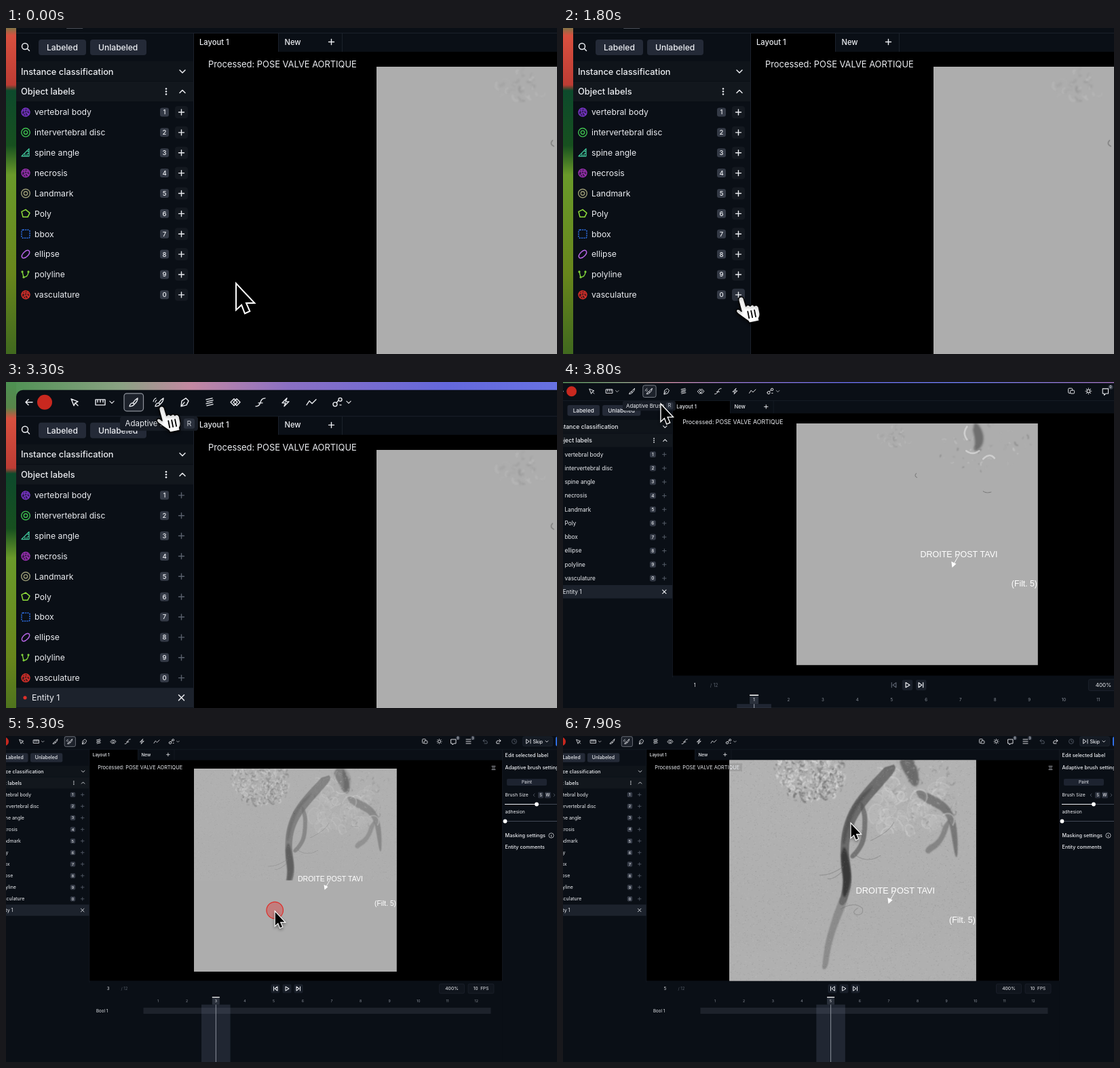
Animation, 812 px wide and 480 px high, one loop 8000 ms. Source, as an HTML page with a canvas:

```html
<!DOCTYPE html>
<html lang="en">
<head>
<meta charset="utf-8">
<style>
html, body { margin: 0; width: 812px; height: 480px; overflow: hidden; background: #0a0e15; }
canvas { display: block; width: 812px; height: 480px; }
</style>
</head>
<body>
<canvas id="stage" width="812" height="480"></canvas>
<script>
const LOOP = 8000, FIT = 0.5707, FIT_X = -34.8, FIT_Y = -8.9;
const BG = '#0a0f16', EDGE = '#1b212b', WHITE = '#eceef2', DIM = '#59606c';
const stage = document.getElementById('stage').getContext('2d');
let g = stage;

const clamp = v => Math.max(0, Math.min(1, v));
const ease = v => { v = clamp(v); return v * v * (3 - 2 * v); };
const spring = ms => { const k = Math.max(0, ms) * 0.0067; return 1 - (1 + k) * Math.exp(-k); };

function rng(seed) {
  return () => {
    seed = (seed * 1664525 + 1013904223) >>> 0;
    return seed / 4294967296;
  };
}

// ---------- drawing helpers ----------
function rect(x, y, w, h, color) {
  g.fillStyle = color;
  g.fillRect(x, y, w, h);
}

function box(x, y, w, h, r, fill, stroke, lw = 1) {
  g.beginPath();
  g.roundRect(x, y, w, h, r);
  if (fill) { g.fillStyle = fill; g.fill(); }
  if (stroke) { g.strokeStyle = stroke; g.lineWidth = lw; g.stroke(); }
}

function disc(x, y, r, fill, stroke, lw = 1) {
  g.beginPath();
  g.arc(x, y, r, 0, 7);
  if (fill) { g.fillStyle = fill; g.fill(); }
  if (stroke) { g.strokeStyle = stroke; g.lineWidth = lw; g.stroke(); }
}

// y is the middle of the capital letters
function text(str, x, y, size, color = WHITE, weight = 400, align = 'left', face = 'Inter') {
  g.font = `${weight} ${size}px ${face}, sans-serif`;
  g.textAlign = align;
  g.fillStyle = color;
  g.fillText(str, x, y + size * 0.36);
}

function icon(d, x, y, color = WHITE, lw = 1.5, scale = 1, fill) {
  g.save();
  g.translate(x, y);
  g.scale(scale, scale);
  g.lineCap = g.lineJoin = 'round';
  const p = new Path2D(d);
  if (fill) { g.fillStyle = fill; g.fill(p); }
  if (lw) { g.strokeStyle = color; g.lineWidth = lw; g.stroke(p); }
  g.restore();
}

const SHAPES = {
  down: 'M-4 -2L0 2L4 -2',
  up: 'M-4 2L0 -2L4 2',
  plus: 'M-4 0H4M0 -4V4',
  cross: 'M-4 -4L4 4M4 -4L-4 4',
  back: 'M5 0H-5M-1 -4L-5 0L-1 4',
  pointer: 'M-5 -5L5 -1L1 1L-1 5ZM1 1L5 5',
  ruler: 'M-7 -4H7V4H-7ZM-4 -4V0M0 -4V0M4 -4V0',
  brush: 'M6 -6Q2 -4 -1 1L1 3Q6 -1 6 -6M-1 1Q-5 1 -6 6Q-1 6 1 3',
  pen: 'M-5 6L-4 -2L2 -6L6 -2L3 4ZM-5 6L0 0',
  hatch: 'M-5 -4L4 -6M-4 -1L5 -3M-5 2L4 0M-4 5L5 3',
  weave: 'M-7 0L-2 -5L3 0L-2 5ZM-3 0L2 -5L7 0L2 5Z',
  curve: 'M-7 6C3 6 -3 -6 7 -6M-3 1H3',
  bolt: 'M2 -6L-5 1H0L-2 6L5 -1H0Z',
  trend: 'M-7 4L-3 -2L1 2L7 -4',
  nodes: 'M-6 3A3 3 0 1 0 0 3A3 3 0 1 0 -6 3M2 -4A2.5 2.5 0 1 0 7 -4A2.5 2.5 0 1 0 2 -4M-1 1L2 -3M4 4H6'
};

// ---------- angiogram picture ----------
const PIC = { x: 276.8, y: 48.2, size: 298.9 }, RES = 2;

function layer(paint) {
  const c = document.createElement('canvas');
  c.width = c.height = Math.round(PIC.size * RES);
  g = c.getContext('2d');
  g.scale(RES, RES);
  g.translate(-PIC.x, -PIC.y);
  paint();
  g = stage;
  return c;
}

// tapered tube through [x, y, width] points
function tube(pts, color, blur = 1.2) {
  const left = [], right = [];
  pts.forEach(([x, y, w], i) => {
    const a = pts[Math.max(0, i - 1)], b = pts[Math.min(pts.length - 1, i + 1)];
    const len = Math.hypot(b[0] - a[0], b[1] - a[1]);
    const nx = -(b[1] - a[1]) / len * w / 2, ny = (b[0] - a[0]) / len * w / 2;
    left.push([x + nx, y + ny]);
    right.unshift([x - nx, y - ny]);
  });
  const ring = left.concat(right);
  g.beginPath();
  ring.forEach((p, i) => {
    const q = ring[(i + 1) % ring.length];
    const mx = (p[0] + q[0]) / 2, my = (p[1] + q[1]) / 2;
    i ? g.quadraticCurveTo(p[0], p[1], mx, my) : g.moveTo(mx, my);
  });
  g.closePath();
  g.filter = `blur(${blur}px)`;
  g.fillStyle = color;
  g.fill();
  g.filter = 'none';
}

// irregular light and dark flecks inside an ellipse
function speckle(seed, n, cx, cy, rx, ry, alpha) {
  const rnd = rng(seed);
  g.filter = 'blur(0.8px)';
  for (let i = 0; i < n; i++) {
    const a = rnd() * 6.283, d = Math.sqrt(rnd()), turn = rnd() * 6.283;
    const tone = rnd() < 0.6 ? 235 : 90;
    g.strokeStyle = `rgba(${tone},${tone},${tone},${alpha * rnd()})`;
    g.lineWidth = 0.7 + rnd() * 1.8;
    g.beginPath();
    g.arc(cx + Math.cos(a) * rx * d, cy + Math.sin(a) * ry * d, 0.8 + rnd() * 3, turn, turn + 1 + rnd() * 2);
    g.stroke();
  }
  g.filter = 'none';
}

// soft rounded cells with bright rims
function loops(seed, n, x, y, w, h, fill) {
  const rnd = rng(seed);
  g.filter = 'blur(1.1px)';
  for (let i = 0; i < n; i++) {
    g.beginPath();
    g.ellipse(x + rnd() * w, y + rnd() * h, 6 + rnd() * 8, 5 + rnd() * 5, rnd() * 3, rnd() * 3, 4 + rnd() * 2);
    g.fillStyle = `rgba(200,200,200,${fill})`;
    g.fill();
    g.strokeStyle = `rgba(215,215,215,${0.2 + rnd() * 0.35})`;
    g.lineWidth = 1.6;
    g.stroke();
  }
  g.filter = 'none';
}

function grain(n, alpha) {
  const rnd = rng(77);
  for (let i = 0; i < n; i++) {
    const tone = rnd() < 0.5 ? 255 : 60;
    rect(PIC.x + rnd() * PIC.size, PIC.y + rnd() * PIC.size, 1.2, 0.8, `rgba(${tone},${tone},${tone},${alpha})`);
  }
}

const plain = layer(() => {
  rect(PIC.x, PIC.y, PIC.size, PIC.size, '#adadad');
  speckle(4, 60, 510, 78, 58, 30, 0.3);
  speckle(7, 40, 398, 65, 20, 13, 0.2);
  tube([[497, 48, 8], [503, 62, 12], [503, 74, 10], [498, 82, 3]], 'rgba(85,85,85,.7)', 2.5);
  icon('M488 52Q482 60 488 68M487 82Q495 88 503 82M508 92Q516 84 522 91', 0, 0, 'rgba(225,225,225,.65)', 2.2);
  icon('M508 132Q512 135 518 133M425 110Q422 113 426 115', 0, 0, 'rgba(90,90,90,.6)', 0.8);
});

const filled = layer(() => {
  const shade = g.createLinearGradient(0, PIC.y, 0, PIC.y + PIC.size);
  shade.addColorStop(0, '#b3b3b3');
  shade.addColorStop(0.6, '#afafaf');
  shade.addColorStop(1, '#b1b1b1');
  rect(PIC.x, PIC.y, PIC.size, PIC.size, shade);
  speckle(9, 650, 374, 64, 42, 38, 0.6);
  speckle(12, 160, 394, 80, 20, 18, 0.5);
  loops(33, 26, 452, 60, 88, 82, 0.25);
  tube([[488, 46, 15], [493, 58, 17], [499, 70, 15], [503, 84, 8]], 'rgba(75,75,75,.68)', 2);
  tube([[503, 91, 8], [514, 97, 11], [528, 104, 12], [540, 112, 10], [547, 126, 8], [550, 146, 7], [552, 170, 3]], 'rgba(80,80,80,.6)', 1.8);
  tube([[542, 124, 7], [536, 144, 6], [528, 155, 7], [519, 160, 8], [516, 165, 6]], 'rgba(90,90,90,.5)', 1.8);
  loops(51, 7, 470, 95, 70, 40, 0.1);
  speckle(21, 170, 505, 95, 50, 50, 0.35);
  // side branch, upper trunk, fading lower trunk
  tube([[436, 104, 5], [441, 118, 6], [441, 134, 6], [439, 151, 6], [432, 163, 6], [424, 171, 6]], 'rgba(85,85,85,.65)');
  tube([[476, 58, 12], [463, 73, 13], [449, 88, 14], [430, 111, 13], [419, 136, 11], [416, 160, 10],
    [418, 184, 11], [420.5, 200, 10], [416, 219, 9], [412, 228, 7]], 'rgba(82,82,82,.72)');
  tube([[417, 214, 9], [412, 230, 10], [405.5, 246, 9], [401, 260, 8], [397.5, 272, 8], [394.5, 288, 7],
    [393, 300, 7], [391, 306, 4]], 'rgba(105,105,105,.5)', 1.5);
  tube([[415, 158, 5], [417, 175, 10], [420, 196, 10], [416, 218, 5]], 'rgba(35,35,35,.7)', 2);
  tube([[450, 84, 4], [430, 106, 5], [419, 130, 5], [415, 155, 4]], 'rgba(45,45,45,.35)', 2);
  icon('M412 233Q428 223 438 232Q440 240 431 240Q424 237 432 232M414 182Q400 192 386 192M413 188Q402 198 396 196M430 168Q445 178 460 168M448 150Q470 140 476 128',
    0, 0, 'rgba(95,95,95,.32)', 1);
  grain(9000, 0.08);
});

function picture(frame, t) {
  g.save();
  g.beginPath();
  g.rect(123.3, 35.6, 608.4, 324.8);
  g.clip();
  const zoom = 1 + 0.216 * ease((t - 7200) / 550);
  g.translate(422.7, 131.3);
  g.scale(zoom, zoom);
  g.translate(-422.7, -131.3);
  const { x, y, size } = PIC;
  g.drawImage(plain, x, y, size, size);
  if (frame > 1) {
    // contrast agent runs downwards as the frames advance
    const part = [0, 0, 0.3, 0.55, 0.8, 1][frame];
    g.save();
    g.beginPath();
    g.rect(x, y, size, size * part);
    g.clip();
    g.globalAlpha = 0.25 + part * 0.75;
    g.drawImage(filled, x, y, size, size);
    g.restore();
  }
  text('DROITE POST TAVI', 430, 210, 10.5, '#fff', 400, 'left', 'Liberation Sans');
  text('(Filt. 5)', 543, 246, 10.3, '#fff', 400, 'left', 'Liberation Sans');
  icon('M478 211L471 223', 0, 0, '#fff', 0.8);
  icon('M468.5 219L474.5 222L469.5 226.5Z', 0, 0, '#fff', 0, 1, '#fff');
  g.restore();
}

// ---------- interface ----------
const LABELS = [
  ['vertebral body', 'mesh', '#7a35c8'], ['intervertebral disc', 'ring', '#3fc04f'],
  ['spine angle', 'angle', '#3fc096'], ['necrosis', 'mesh', '#9a30b0'],
  ['Landmark', 'ring', '#9a9a74'], ['Poly', 'poly', '#8fdc3a'],
  ['bbox', 'bbox', '#2f72ea'], ['ellipse', 'ellipse', '#b765e6'],
  ['polyline', 'path', '#7fd03a'], ['vasculature', 'mesh', '#d8302a']
];

function mark(kind, x, y, c) {
  if (kind === 'mesh') {
    disc(x, y, 6, c + '55', c, 1.4);
    icon('M-6 -1Q0 -5 6 -1M-4 4Q0 -2 5 3M-1 -6Q-3 0 1 6M3 -5Q0 0 4 4', x, y, c, 1.1);
  } else if (kind === 'ring') {
    disc(x, y, 6.3, null, c, 1.4);
    disc(x, y, 2.7, null, c, 1.4);
  } else if (kind === 'angle') {
    icon('M-6 5H5V-6ZM-1 5V2M2 5V2M5 1H3M5 -2H3', x, y, c, 1.3);
  } else if (kind === 'poly') {
    icon('M-6 -3L0 -6L6 -1L3 5L-4 5Z', x, y, c, 1.5);
  } else if (kind === 'bbox') {
    g.setLineDash([2, 1.2]);
    box(x - 6, y - 6, 12, 12, 2, null, c, 1.5);
    g.setLineDash([]);
  } else if (kind === 'ellipse') {
    icon('M-5 5C-8 1 1 -8 5 -5C8 -1 -1 8 -5 5Z', x, y, c, 1.5);
  } else {
    icon('M-5 -4L-3 4Q3 4 4 -3', x, y, c, 1.4);
    disc(x - 5, y - 4, 1.6, c);
    disc(x - 3, y + 4, 1.6, c);
    disc(x + 4, y - 4, 1.6, c);
  }
}

function desktop() {
  const side = g.createLinearGradient(0, 0, 0, 540);
  [[0, '#4d9152'], [0.07, '#58854a'], [0.1, '#d8503f'], [0.235, '#bd3c34'], [0.25, '#0d4a2c'],
    [0.4, '#17501f'], [0.48, '#6a9a2a'], [0.75, '#68861c'], [1, '#3b651f']].forEach(s => side.addColorStop(...s));
  rect(-100, -20, 130, 1000, side);
  const top = g.createLinearGradient(0, 0, 1300, 0);
  [[0, '#4d9152'], [0.13, '#8aa283'], [0.21, '#c488a2'], [0.32, '#8b70c4'], [0.5, '#6468dc'],
    [0.7, '#6a78e6'], [1, '#a06aa8']].forEach(s => top.addColorStop(...s));
  rect(15, -20, 1500, 40, top);
}

function toolbar(tool) {
  icon(SHAPES.back, 34, 30);
  disc(57, 30, 11, '#c8281f');
  const sel = { pointer: 101, brush: 188, adaptive: 226 }[tool];
  box(sel - 14, 17, 28.5, 26, 4, '#1d222b', '#8d929b', 1.2);
  [['pointer', 101], ['ruler', 139], ['brush', 188], ['brush', 226], ['pen', 263], ['hatch', 300], ['weave', 338],
    ['curve', 375], ['bolt', 412], ['trend', 450], ['nodes', 488]].forEach(([k, x]) => icon(SHAPES[k], x, 30, WHITE, 1.4));
  icon('M-6 -1Q-5 -5 -2 -6M-3 0Q-3 -2 -1 -3', 223, 30, WHITE, 1.1);
  icon(SHAPES.down, 156, 30, WHITE, 1.3, 0.8);
  icon(SHAPES.down, 505, 30, WHITE, 1.3, 0.8);
}

function sidebar(t, added) {
  disc(28, 70, 4.5, null, WHITE, 1.5);
  icon('M0 0L3 3', 31.5, 73.5);
  box(48, 60, 70, 23, 4, '#242a37');
  box(124, 60, 83, 23, 4, '#242a37');
  text('Labeled', 60, 71.5, 12.1, WHITE, 500);
  text('Unlabeled', 136, 71.5, 12.1, WHITE, 500);
  rect(15, 92, 261, 29, '#0f141a');
  rect(15, 122, 261, 29, '#12171d');
  text('Instance classification', 22, 107, 12.8, WHITE, 500);
  icon(SHAPES.down, 260, 107);
  text('Object labels', 22, 136.5, 12.8, WHITE, 500);
  [-4, 0, 4].forEach(d => disc(236, 136.5 + d, 1.3, WHITE));
  icon(SHAPES.up, 260, 136.5);
  LABELS.forEach(([name, kind, color], i) => {
    const y = 167 + i * 29.87;
    mark(kind, 29, y, color);
    text(name, 42, y, 12.2);
    box(227, y - 6.5, 13, 13, 3, '#343a46');
    text(String((i + 1) % 10), 233.5, y, 9.5, WHITE, 500, 'center');
    if (!added) box(249, y - 9, 19, 18, 4, i === 9 && t > 1200 ? '#2a303b' : '#141920');
    icon(SHAPES.plus, 258.5, y, added ? DIM : WHITE, 1.4);
  });
  if (added) {
    rect(15, 450.5, 261, 29, '#1c222c');
    disc(28, 465, 2.6, '#e0302a');
    text('Entity 1', 38, 465, 12.3);
    icon(SHAPES.cross, 258.5, 465, WHITE, 1.5);
  }
}

function tabs() {
  rect(15, 50, 1500, 1, EDGE);
  rect(276, 51, 1, 600, EDGE);
  rect(277, 51, 124, 28, '#000');
  rect(401, 51, 1, 27, EDGE);
  rect(495, 51, 1, 27, EDGE);
  text('Layout 1', 285, 63.5, 11.2, WHITE, 500);
  text('New', 410.5, 63.5, 11.2, WHITE, 500);
  icon(SHAPES.plus, 479.5, 63.5, WHITE, 1.4);
}

function rightPanel() {
  rect(731.7, 35.6, 120, 450, BG);
  rect(731.2, 20, 0.6, 341, EDGE);
  text('Edit selected label', 735.5, 28.5, 7.3, WHITE, 500);
  text('Adaptive brush settings', 735.5, 46, 7.3, WHITE, 500);
  box(738, 63, 59, 10, 2, '#1d2330');
  text('Paint', 767.5, 68, 6.3, WHITE, 400, 'center');
  text('Brush Size', 735.5, 87, 6.8);
  icon('M1 -2L-1 0L1 2', 778, 87, DIM, 0.8);
  box(784, 82.5, 8, 9, 1.5, '#2a303c');
  box(794, 82.5, 9, 9, 1.5, '#2a303c');
  text('S', 788, 87, 5.8, WHITE, 500, 'center');
  text('W', 798.5, 87, 5.8, WHITE, 500, 'center');
  icon('M-1 -2L1 0L-1 2', 808, 87, DIM, 0.8);
  rect(735, 100, 100, 1, '#414855');
  rect(735, 100, 47, 1, WHITE);
  disc(782, 100.5, 2.9, '#fff');
  text('adhesion', 735.5, 112, 6.8);
  rect(735, 125, 100, 1, '#414855');
  disc(735.5, 125.5, 2.9, '#fff');
  text('Masking settings', 735.5, 146.5, 7.3, WHITE, 500);
  disc(803.5, 146.5, 3.6, null, WHITE, 0.7);
  rect(803.1, 145.5, 0.8, 3, WHITE);
  text('Entity comments', 735.5, 163.5, 7.3, WHITE, 500);
}

function topRight() {
  box(613.5, 4.5, 5, 6, 1, null, WHITE, 0.8);
  box(616, 7, 5, 4, 1, BG, WHITE, 0.8);
  disc(638.5, 8, 2, null, WHITE, 0.9);
  for (let a = 0; a < 8; a++) disc(638.5 + 3.6 * Math.cos(a * 0.785), 8 + 3.6 * Math.sin(a * 0.785), 0.5, WHITE);
  icon('M-4 -3H3V3H0L-2 5V3H-4Z', 660, 8, WHITE, 0.9);
  icon('M-3 -3H4M-3 0H4M-3 3H4', 681, 8, WHITE, 0.9);
  [['0', 666], ['3', 688]].forEach(([s, x]) => {
    disc(x, 3, 3, '#343a46');
    text(s, x, 3, 4.5, WHITE, 500, 'center');
  });
  const turn = 'M-3 -1H2Q4 0 3 3H-1M-1 -3L-3 -1L-1 1';
  icon(turn, 706, 8, DIM, 0.9);
  g.save();
  g.scale(-1, 1);
  icon(turn, -726, 8, WHITE, 0.9);
  g.restore();
  disc(749, 8, 3.5, null, DIM, 0.8);
  icon('M0 -2V0L2 1', 749, 8, DIM, 0.8);
  box(761.5, 1, 44, 14, 2.5, '#141a23', '#222935', 0.6);
  icon('M-3 -3L1 0L-3 3ZM3 -3V3', 770, 8, WHITE, 0.9);
  text('Skip', 776.5, 8, 7, WHITE, 500);
  icon(SHAPES.down, 797, 8, WHITE, 1.6, 0.5);
  box(810, 1, 30, 14, 2.5, '#2f6de0');
}

function timeline(frame) {
  text(String(frame), 150.5, 372, 6, WHITE, 400, 'center');
  text('/ 12', 169.5, 372, 6, DIM);
  [397, 414, 431].forEach((x, i) => {
    if (i || frame > 1) box(x - 6.5, 365.5, 13, 13, 2, '#191f29');
  });
  const skip = 'M-2.5 -3V3M3 -3L-1 0L3 3Z';
  icon(skip, 397, 372, frame > 1 ? WHITE : DIM, 1);
  icon('M-2 -3L3 0L-2 3Z', 414, 372, WHITE, 1);
  icon('M2.5 -3V3M-3 -3L1 0L-3 3Z', 431, 372, WHITE, 1);
  box(638.5, 365, 37, 14, 2, '#10151d', '#222833', 0.6);
  box(681, 365, 38, 14, 2, '#10151d', '#222833', 0.6);
  text('400%', 657, 372, 6.8, WHITE, 400, 'center');
  text('10  FPS', 700, 372, 6.5, WHITE, 400, 'center');
  const at = n => 224 + (n - 1) * 42.65, x = at(frame);
  box(x - 5.5, 386, 11, 9.5, 1, '#2a303b');
  rect(x - 5.5, 384, 11, 1.3, '#fff');
  for (let n = 1; n <= 12; n++) text(String(n), at(n), 390.5, 5.2, n === frame ? WHITE : '#8b919b', 400, 'center');
  text('Bool 1', 133, 405, 6.2);
  rect(202.5, 400, 512, 9, '#1d222b');
  rect(x - 21.3, 395.5, 42.6, 100, 'rgba(120,132,160,.2)');
  rect(x - 0.5, 395.5, 1, 100, '#8c929c');
}

// ---------- pointer ----------
const TRACK = [
  [0, 339, 417], [400, 339, 417], [1400, 262, 440], [2200, 262, 440], [3000, 229, 37], [3450, 229, 37],
  [3800, 250.6, 55], [4500, 745, 502], [5000, 748, 500], [6000, 781, 340], [6250, 781, 340], [6500, 775.9, 385.3],
  [6700, 775, 388], [7150, 804, 238], [8000, 804, 238]
];

function pointerAt(t) {
  let i = 1;
  while (i < TRACK.length - 1 && TRACK[i][0] < t) i++;
  const [t0, x0, y0] = TRACK[i - 1], [t1, x1, y1] = TRACK[i];
  const k = ease((t - t0) / (t1 - t0));
  return [x0 + (x1 - x0) * k, y0 + (y1 - y0) * k];
}

function brush(t) {
  if (t < 4050 || t > 6800) return;
  const adapted = t > 5650;
  const [x, y] = pointerAt(adapted ? t - 250 : t);
  g.beginPath();
  for (let a = 0; a < 6.283; a += 0.1) {
    // the adapted outline is a lobed blob, notched at the top
    const r = adapted ? 18.5 + 1.5 * Math.cos(a * 4) - 6 * Math.exp(-8 * (a - 4.7) ** 2) : 21.5;
    g.lineTo(x + r * Math.cos(a), y + r * Math.sin(a) * (adapted ? 0.92 : 1));
  }
  g.closePath();
  g.fillStyle = adapted ? 'rgba(215,45,40,.35)' : 'rgba(225,60,60,.42)';
  g.fill();
  g.strokeStyle = '#e02a25';
  g.lineWidth = 2;
  g.stroke();
}

function pointer(t) {
  const [x, y] = pointerAt(t);
  const hand = (t > 1200 && t < 2300) || (t > 2850 && t < 3600);
  g.save();
  g.translate(x, y);
  g.shadowColor = 'rgba(0,0,0,.45)';
  g.shadowBlur = 4;
  g.shadowOffsetY = 2;
  if (hand) {
    g.rotate(-0.2);
    icon('M-4 4Q-4 -1 0 -1Q4 -1 4 4L5 14Q8 11 11 15Q15 12 17 16Q21 14 23 19L23 27Q23 32 20 35L20 39L5 39L4 36Q-2 30 -9 22Q-12 18 -9 16Q-6 15 -3 20Z',
      0, 0, '#000', 1.4, 1, '#fff');
    g.shadowColor = 'transparent';
    icon('M6 22V32M11 22V32M16 22V32', 0, 0, '#000', 1.8);
  } else {
    const p = new Path2D('M1 4.5V39L8.5 32L13.5 45L19 42.5L13.5 30H25Z');
    g.lineJoin = 'miter';
    g.strokeStyle = '#fff';
    g.lineWidth = 4;
    g.stroke(p);
    g.shadowColor = 'transparent';
    g.fillStyle = '#000';
    g.fill(p);
  }
  g.restore();
}

function inFit(paint) {
  g.save();
  g.scale(1 / FIT, 1 / FIT);
  g.translate(-FIT_X, -FIT_Y);
  paint();
  g.restore();
}

function render(t) {
  const added = t >= 1950;
  const tool = !added ? 'pointer' : t < 3400 ? 'brush' : 'adaptive';
  const frame = 1 + [5000, 5200, 5400, 5600].filter(s => t >= s).length;
  const out = spring(t - 3400);
  const zoom = 1 - (1 - FIT) * out;
  const pan = -43 * (1 - spring(t - 2150));

  g.setTransform(1, 0, 0, 1, 0, 0);
  rect(0, 0, 812, 480, BG);
  g.setTransform(zoom, 0, 0, zoom, FIT_X * out, FIT_Y * out + pan);
  desktop();
  box(15, 12, 1600, 1200, 10, BG);
  toolbar(tool);
  tabs();
  sidebar(t, added);
  rect(277, 78, 1066, 569, '#000');
  inFit(() => {
    picture(frame, t);
    rect(131.5, 40.3, 132.5, 11.5, 'rgba(0,0,0,.1)');
    icon('M-2.5 -2.5H2.5M-2 0H2M-2.5 2.5H2.5', 718.5, 47, '#b8bcc4', 0.9);
    rightPanel();
    topRight();
    timeline(frame);
  });
  text('Processed: POSE VALVE AORTIQUE', 298, 96.5, 12.9);
  if (t > 3050 && t < 3950) {
    box(168, 51, 115, 21, 4, '#171c25');
    text('Adaptive Brush', 175.5, 61, 11.5);
    box(262, 54, 16, 15, 3, '#2b313d');
    text('R', 270, 61, 10.5, '#c9cdd4', 400, 'center');
  }
  brush(t);
  pointer(t);
}

function tick(now) {
  render(now % LOOP);
  requestAnimationFrame(tick);
}
requestAnimationFrame(tick);
</script>
</body>
</html>
```
